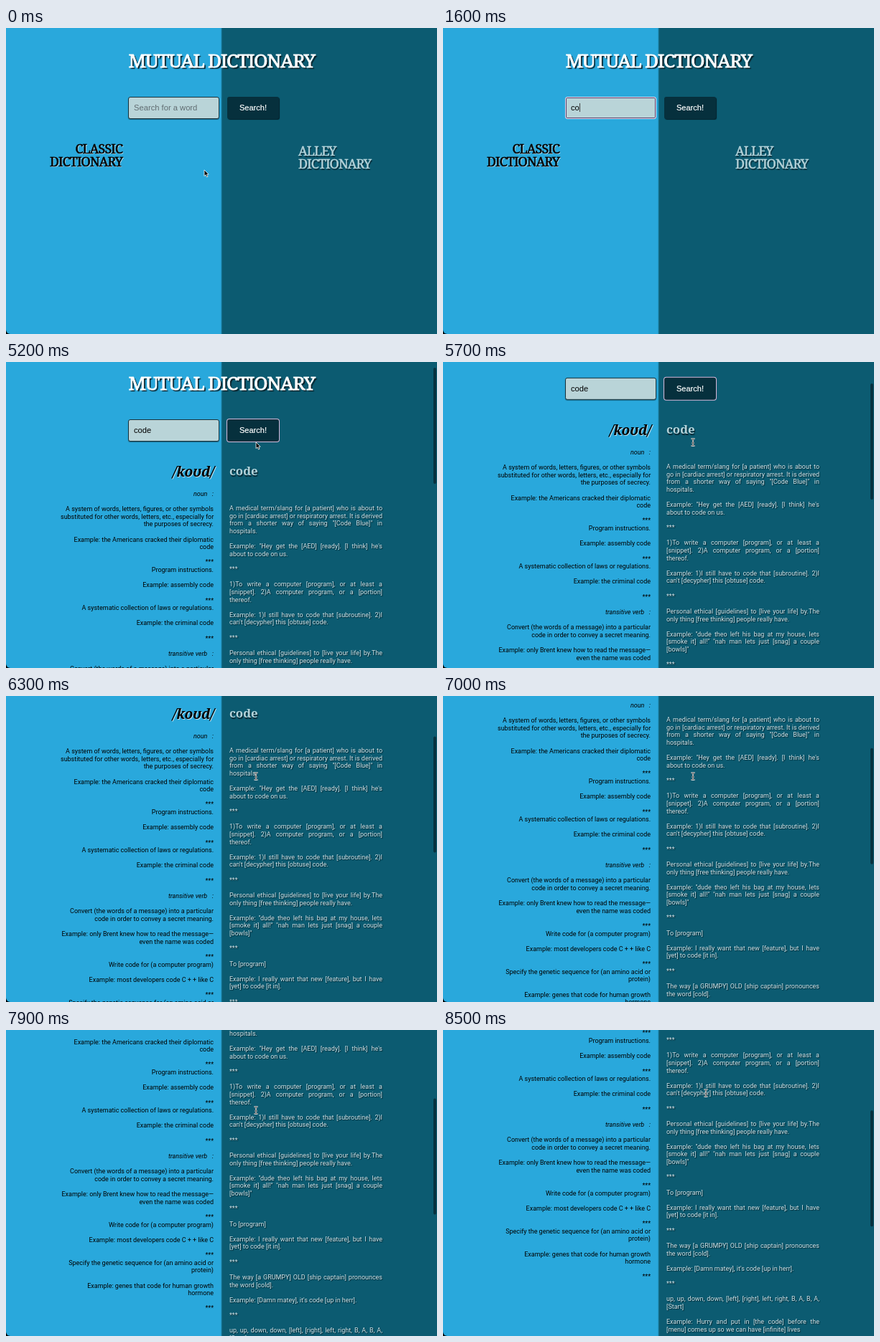
Recreate the animation shown at these times as an HTML page. Size 600 by 427 pixels, loop 8600 ms.

```html
<!DOCTYPE html>
<html lang="en">
<head>
<meta charset="utf-8">
<title>Dictionary search</title>
<style>
  html, body { margin: 0; width: 100%; height: 100%; overflow: hidden; background: #000; }
  #stage {
    position: relative; width: 600px; height: 427px; overflow: hidden;
    border-bottom-left-radius: 6px;
    background: linear-gradient(90deg, #29a8dc 299px, #0c5b71 301px);
  }
  #stage * { box-sizing: border-box; }
  #page, #page > *, #thumb, #pointer, #beam { position: absolute; }
  #page { inset: 0; }
  h1, h2 { margin: 0; font-family: "Noto Serif", serif; white-space: nowrap; }
  h1, .intro { font-weight: 400; letter-spacing: -.05em; -webkit-text-stroke: .03em; }
  h1 {
    left: 0; width: 600px; top: 29px; text-align: center;
    font-size: 26.3px; line-height: 32px; color: #fff; text-shadow: 2px 2px 1px #0a1a20;
  }
  h2 { font-size: 17.9px; line-height: 18px; }
  .classic { color: #000; text-align: right; }
  .slang { color: #b4d3da; text-shadow: 1px 2px 1px #06222c; }
  h2.classic { text-shadow: 1px 1px 0 #b9dcea; }
  #classicTitle { right: 438px; top: 159px; }
  #slangTitle { left: 407px; top: 161.5px; }
  #phonetic { right: 310px; top: 160px; font-size: 19px; font-style: italic; }
  #headword { left: 311px; top: 159px; font-size: 16.8px; }

  #field, #button {
    top: 96px; height: 31px; border-radius: 3px; line-height: 29px; white-space: pre;
    font-family: "Liberation Sans", Arial, sans-serif; font-size: 11.2px;
  }
  #field {
    left: 170px; width: 127px; padding-left: 7px; color: #000;
    background: #b9d4d8; border: 1px solid #17333d; box-shadow: 0 1px 1px rgba(0, 0, 0, .4);
  }
  #field.empty { color: #606c71; }
  #field.focus { border-color: #e6dcec; box-shadow: inset 0 0 0 1px #5b3f6b; }
  #caret { display: inline-block; width: 1px; height: 12px; background: #444; vertical-align: -2px; }
  #button {
    left: 308px; width: 72px; color: #fff; text-align: center; font-size: 11px; line-height: 31px;
    background: #06303d; box-shadow: 1px 1px 1px #04222c; -webkit-text-stroke: .2px;
  }
  #button.focus { box-shadow: 0 0 0 1px #d9b9da; }

  .column {
    width: 213px; font-family: Roboto, sans-serif; font-size: 8.97px;
    line-height: 10.64px; white-space: nowrap;
  }
  .column div { height: 10.64px; }
  .column .full { text-align-last: justify; }
  .column .kind { font-style: italic; }
  #classicText { left: 76px; top: 194.8px; }
  #slangText { left: 311px; top: 215px; color: #d0e2e7; text-shadow: 1px 1px 1px rgba(0, 0, 0, .6); }

  #thumb { left: 595px; width: 4px; height: 162px; border-radius: 2px; background: #07323f; }
  #pointer, #beam { left: 0; top: 0; overflow: visible; }
</style>
</head>
<body>
<div id="stage">
  <div id="page">
    <h1>MUTUAL DICTIONARY</h1>
    <div id="field"></div>
    <div id="button">Search!</div>
    <h2 id="classicTitle" class="classic intro">CLASSIC<br>DICTIONARY</h2>
    <h2 id="slangTitle" class="slang intro">ALLEY<br>DICTIONARY</h2>
    <h2 id="phonetic" class="classic result">/koʊd/</h2>
    <h2 id="headword" class="slang result">code</h2>
    <div id="classicText" class="column classic result"></div>
    <div id="slangText" class="column result"></div>
  </div>
  <div id="thumb"></div>
  <svg id="pointer" width="8" height="12">
    <path d="M0 0V8.6L2 6.8L3.5 10L5 9.3L3.6 6.2H6.2Z" fill="#000" stroke="#fff" stroke-width=".8"/>
  </svg>
  <svg id="beam" width="8" height="12" fill="none">
    <defs><path id="beamPath" d="M-2.5-5Q0-5 0-3.5Q0-5 2.5-5M0-3.5V3.5M-2.5 5Q0 5 0 3.5Q0 5 2.5 5M-1.5 1H1.5"/></defs>
    <use href="#beamPath" stroke="#fff" stroke-width="2"/>
    <use href="#beamPath" stroke="#222" stroke-width=".8"/>
  </svg>
</div>
<script>
const LOOP = 8600, STEP = 100;
const $ = id => document.getElementById(id);

const classicText = `noun\u00a0\u00a0\u00a0:

A system of words, letters, figures, or other symbols
substituted for other words, letters, etc., especially for
the purposes of secrecy.

Example: the Americans cracked their diplomatic
code

***
Program instructions.

Example: assembly code

***
A systematic collection of laws or regulations.

Example: the criminal code

***

transitive verb\u00a0\u00a0\u00a0:

Convert (the words of a message) into a particular
code in order to convey a secret meaning.

Example: only Brent knew how to read the message—
even the name was coded

***
Write code for (a computer program)

Example: most developers code C + + like C

***
Specify the genetic sequence for (an amino acid or
protein)

Example: genes that code for human growth
hormone

***`;

const slangText = `A medical term/slang for [a patient] who is about to
go in [cardiac arrest] or respiratory arrest. It is derived
from a shorter way of saying "[Code Blue]" in
hospitals.

Example: "Hey get the [AED] [ready]. [I think] he's
about to code on us.

***

1)To write a computer [program], or at least a
[snippet]. 2)A computer program, or a [portion]
thereof.

Example: 1)I still have to code that [subroutine]. 2)I
can't [decypher] this [obtuse] code.

***

Personal ethical [guidelines] to [live your life] by.The
only thing [free thinking] people really have.

Example: "dude theo left his bag at my house, lets
[smoke it] all!" "nah man lets just [snag] a couple
[bowls]"

***

To [program]

Example: I really want that new [feature], but I have
[yet] to code [it in].

***

The way [a GRUMPY] OLD [ship captain] pronounces
the word [cold].

Example: [Damn matey], it's code [up in herr].

***

up, up, down, down, [left], [right], left, right, B, A, B, A,
[Start]

Example: Hurry and put in [the code] before the
[menu] comes up so we can have [infinite] lives`;

// Every line of a justified paragraph but its last fills the column.
function fillColumn(column, text, justified) {
  const lines = text.split("\n");
  lines.forEach((line, i) => {
    const row = document.createElement("div");
    row.textContent = line;
    row.classList.toggle("full", justified && !!line && !!lines[i + 1]);
    row.classList.toggle("kind", line.endsWith("\u00a0:"));
    column.append(row);
  });
}
fillColumn($("classicText"), classicText, false);
fillColumn($("slangText"), slangText, true);

// Linear interpolation through [time, value] pairs.
function track(keys, t) {
  const next = keys.findIndex(key => key[0] > t);
  if (next === 0) return keys[0][1];
  if (next < 0) return keys[keys.length - 1][1];
  const [t0, v0] = keys[next - 1], [t1, v1] = keys[next];
  return v0 + (v1 - v0) * (t - t0) / (t1 - t0);
}

const scrollKeys = [[5000, 0], [5200, 16], [6300, 144], [7500, 217.5], [8500, 291.5]];
const mouseX = [[0, 276], [700, 240], [2200, 240], [2700, 348], [8100, 348], [8500, 366]];
const mouseY = [[0, 198], [700, 112], [2700, 112], [8100, 112], [8500, 88]];
const typeTimes = [1400, 1600, 1800, 2000];

function show(element, visible) { element.style.visibility = visible ? "visible" : "hidden"; }
function place(element, x, y) { element.style.transform = `translate(${x}px, ${y}px)`; }

function render(t) {
  const scroll = track(scrollKeys, t);
  const typing = t >= 900 && t < 2700;
  const searched = t >= 2800;
  const typed = "code".slice(0, typeTimes.filter(time => time <= t).length);

  place($("page"), 0, -scroll);
  place($("thumb"), 0, 2 + scroll * 0.378);
  show($("thumb"), scroll > 0);

  const field = $("field");
  field.textContent = typed || "Search for a word";
  field.className = (typed ? "" : "empty ") + (typing ? "focus" : "");
  if (typing) {
    const caret = document.createElement("i");
    caret.id = "caret";
    typed ? field.append(caret) : field.prepend(caret);
  }
  $("button").className = t >= 2700 ? "focus" : "";

  document.querySelectorAll(".intro").forEach(el => show(el, !searched));
  document.querySelectorAll(".result").forEach(el => show(el, searched));

  const x = track(mouseX, t), y = track(mouseY, t);
  const overText = t >= 5600 || (t >= 600 && t < 1000);
  show($("beam"), overText);
  show($("pointer"), !overText && (t < 1000 || t >= 2200));
  place($("beam"), x, y);
  place($("pointer"), x, y);
}

function frame(now) {
  render(Math.floor(now % LOOP / STEP) * STEP);
  requestAnimationFrame(frame);
}
requestAnimationFrame(frame);
</script>
</body>
</html>
```
